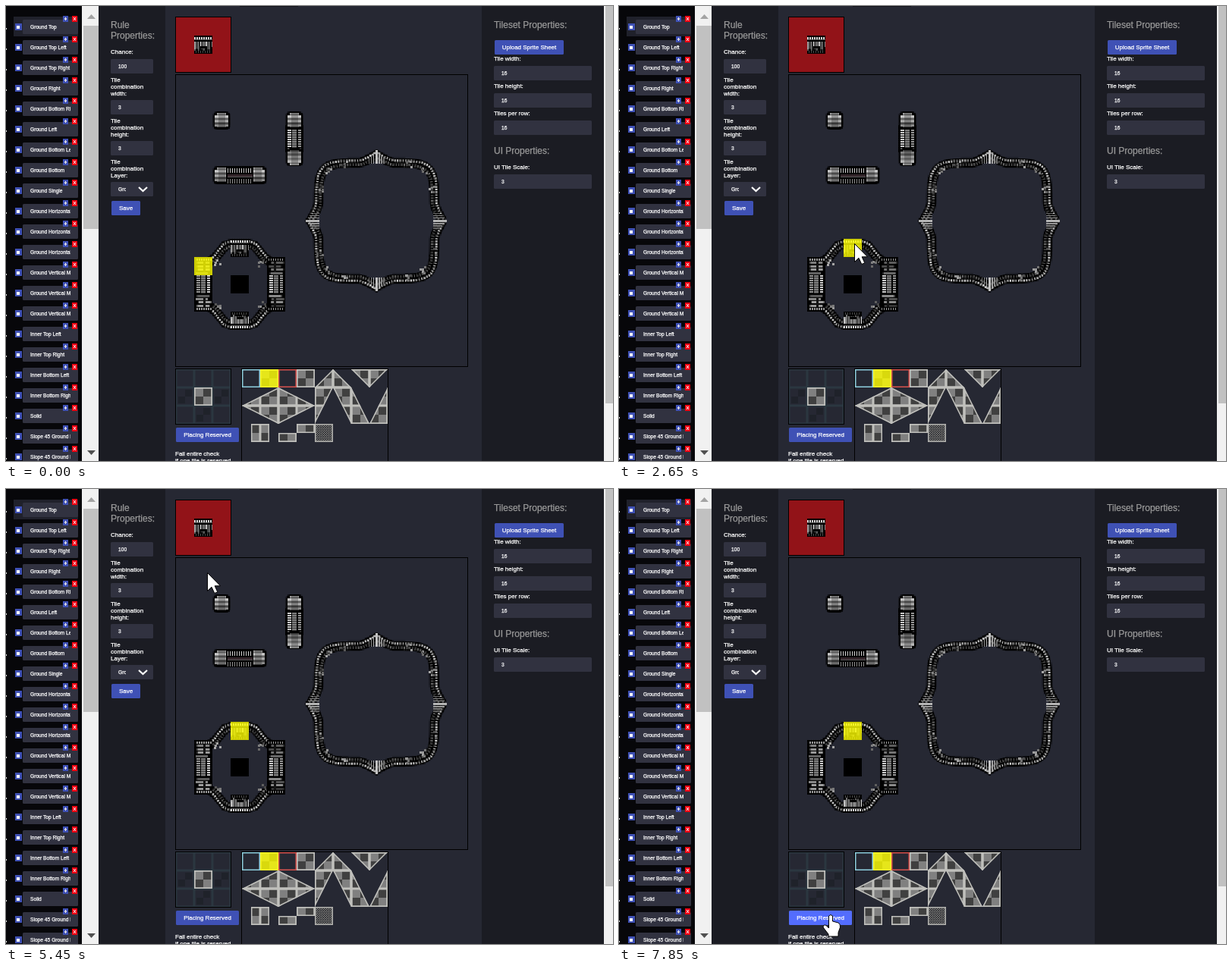
These frames come from a looping animation (800 px wide and 600 px high, 8000 ms). An HTML page with a canvas:

```html
<!DOCTYPE html>
<html lang="en">
<head>
<meta charset="utf-8">
<title>Tile rule editor</title>
<style>
html, body { margin: 0; width: 100%; height: 100%; overflow: hidden; background: #262833; }
#stage { position: relative; width: 800px; height: 600px; overflow: hidden; font: 8px/10px "Liberation Sans", Arial, sans-serif; color: #fff; }
canvas { position: absolute; left: 0; top: 0; }
#stage div { position: absolute; white-space: pre; -webkit-text-stroke: .25px; }
#stage .heading { font-size: 12px; color: #999; margin-top: 1px; }
#stage .value { font-size: 6.67px; overflow: hidden; margin-top: .5px; }
#stage .button { background: #3f51b5; border-radius: 1.5px; height: 19px; line-height: 19px; text-align: center; }
#stage .button.hover { background: #536dfe; }
</style>
</head>
<body>
<div id="stage"><canvas id="scene" width="800" height="600"></canvas></div>
<script>
const stage = document.getElementById('stage');
const c = document.getElementById('scene').getContext('2d');
const TILE = 24;
const SIDES = [1, -1];

// ---------- panels and text ----------
function put(x, y, text, cls = '', width) {
  const el = document.createElement('div');
  el.className = cls;
  el.textContent = text;
  el.style.left = x + 'px';
  el.style.top = y - (cls === 'button' ? 9.5 : 5) + 'px';
  if (width) el.style.width = width + 'px';
  stage.append(el);
  return el;
}
function rect(x, y, w, h, color) {
  c.fillStyle = color;
  c.fillRect(x, y, w, h);
}
function framed(x, y, w, h, color) {
  rect(x, y, w, h, '#000');
  rect(x + 1, y + 1, w - 2, h - 2, color);
}
function outline(x, y, size, color) {
  c.strokeStyle = color;
  c.lineWidth = 1.5;
  c.strokeRect(x + .75, y + .75, size - 1.5, size - 1.5);
}
function chevron(x, y, w, h) {
  c.beginPath();
  c.moveTo(x - w, y); c.lineTo(x, y + h); c.lineTo(x + w, y);
}
function scrollArrow(y, h, color) {
  chevron(112.5, y, 5.5, h);
  c.fillStyle = color;
  c.fill();
}
function field(x, y, w, text, clip = w - 20) {
  c.fillStyle = '#313240';
  c.beginPath();
  c.roundRect(x, y, w, 19, 1.5);
  c.fill();
  put(x + 10, y + 9.5, text, 'value', clip);
}

rect(0, 0, 800, 600, '#262833');
rect(0, 0, 100, 600, '#07070a');
rect(122, 0, 88, 600, '#1b1c23');
rect(627, 0, 161, 600, '#1b1c23');
rect(308, 0, 77, 1, '#14151b');

rect(100, 0, 22, 600, '#f1f1f1');
rect(102, 26, 20, 268, '#c1c1c1');
scrollArrow(17, -6, '#a3a3a3');
scrollArrow(586, 6, '#505050');
rect(788, 0, 12, 600, '#f1f1f1');
rect(790, 0, 10, 524, '#c1c1c1');

const ground = ['Top', 'Top Left', 'Top Right', 'Right', 'Bottom Right', 'Left', 'Bottom Left', 'Bottom', 'Single',
  ...Array(3).fill('Horizontal'), ...Array(3).fill('Vertical Mid')];
const inner = ['Top Left', 'Top Right', 'Bottom Left', 'Bottom Right'];
const rules = [...ground.map(s => 'Ground ' + s), ...inner.map(s => 'Inner ' + s),
  'Solid', 'Slope 45 Ground Left', 'Slope 45 Ground Right'];

rect(10, 14, 85, 26, '#20212b');
rules.forEach((name, i) => {
  const y = 18 + 27 * i;
  field(22, y, 73, name);
  rect(0, y + 11, 1, 2, '#ddd');
  rect(12, y + 5, 9, 9, '#3f51b5');
  rect(14, y + 8, 4, 4, '#fff');
  rect(75, y - 5, 7, 8, '#3f51b5');
  rect(78, y - 3, 1, 4, '#fff');
  rect(77, y - 2, 3, 2, '#ccd');
  rect(87, y - 5, 7, 8, '#f00012');
  for (const s of SIDES) {
    c.strokeStyle = '#fff';
    c.lineWidth = 1;
    c.beginPath();
    c.moveTo(90.5 - 1.5 * s, y - 3);
    c.lineTo(90.5 + 1.5 * s, y + 1);
    c.stroke();
  }
});

put(138, 24, 'Rule', 'heading');
put(138, 38, 'Properties:', 'heading');
put(138, 61, 'Chance:');
['width:', 'height:', 'Layer:'].forEach((word, i) => {
  ['Tile', 'combination', word].forEach((text, j) => put(138, 97.5 + 54 * i + 9 * j, text));
});
['100', '3', '3', 'Ground'].forEach((v, i) => field(138, 70 + 54 * i, 56, v, i === 3 ? 10 : 30));
chevron(180.5, 239, 5.5, 5);
c.strokeStyle = '#fff';
c.lineWidth = 2.2;
c.stroke();
put(139, 266.5, 'Save', 'button', 38);

put(643, 24, 'Tileset Properties:', 'heading');
put(644, 54.5, 'Upload Sprite Sheet', 'button', 91);
['Tile width:', 'Tile height:', 'Tiles per row:'].forEach((text, i) => {
  put(643, 70 + 36 * i, text);
  field(643, 79 + 36 * i, 129, '16');
});
put(643, 190, 'UI Properties:', 'heading');
put(643, 213, 'UI Tile Scale:');
field(643, 222, 129, '3');

const placing = put(224, 565.5, 'Placing Reserved', 'button', 83);
put(223, 590.5, 'Fail entire check');
put(223, 599.5, 'if one tile is reserved');

// ---------- tile map, drawn with 16 px tiles and enlarged ----------
const map = document.createElement('canvas');
map.width = map.height = 256;
const g = map.getContext('2d');

let seed = 11;
const random = () => (seed = seed * 16807 % 2147483647) / 2147483647;
const grey = v => `rgb(${v},${v},${v})`;

function box(x, y, w, h, v) {
  g.fillStyle = grey(v);
  g.fillRect(x, y, w, h);
}
function place(x, y, sx, sy, draw) {
  g.save();
  g.translate(x, y);
  g.scale(sx, sy);
  draw();
  g.restore();
}
function mirror(x, y, draw) {
  for (const sx of SIDES) for (const sy of SIDES) place(x, y, sx, sy, draw);
}
function columns(x, y, w, h, v) {
  for (let i = 0; i < w; i += 2) box(x + i, y, 1, h, v);
}
function rows(x, y, w, h, v) {
  for (let i = 0; i < h; i += 2) box(x, y + i, w, 1, v);
}
function cap(x, y) {
  g.fillStyle = '#000';
  g.beginPath();
  g.roundRect(x + .5, y, 15, 16, 4);
  g.fill();
  for (let i = 1; i < 14; i++) {
    const inset = i < 3 || i > 12 ? 4 : 2;
    const v = 185 - 7 * i + 45 * Math.cos(i * 1.6);
    box(x + inset, y + i, 16 - 2 * inset, 1, v);
    box(x + 5, y + i, 6, 1, v * .75);
  }
}
function groundTop(x, y) {
  box(x, y, 16, 16, 0);
  columns(x, y + 1, 16, 2, 215);
  box(x, y + 3, 16, 1, 80);
  for (let i = 0; i < 16; i++) box(x + i, y + 5, 1, 5 + 3 * random(), 240 * random());
  box(x + 5, y + 9, 6, 2, 0);
  columns(x + 1, y + 13, 14, 2, 75);
}
function pipe(x, y, h) {
  box(x, y, 16, h, 0);
  rows(x + 2, y, 3, h, 205);
  box(x + 6, y, 4, h, 60);
  rows(x + 6, y, 4, h, 125);
  rows(x + 11, y, 3, h, 150);
}
function line(points, scale, width, v, dash = []) {
  g.strokeStyle = grey(v);
  g.lineWidth = width;
  g.setLineDash(dash);
  g.beginPath();
  points.forEach(([x, y]) => g.lineTo(x * scale, y * scale));
  g.stroke();
}
function tube(points, lift) {
  line(points, 1, 8.5, 0);
  line(points, 1 - lift, 2.5, 105, [1, 1.4]);
  line(points, 1 + lift, 2, 210, [1.2, 1.2]);
}
function rivets(x, y) {
  for (let i = 0; i < 5; i++) {
    box(x + Math.floor(6 * random()), y + Math.floor(6 * random()), 2, 2, 60 + 110 * random());
  }
}

// Separate pieces
cap(32, 32);
pipe(96, 44, 24);
cap(96, 32);
place(0, 160, 1, -1, () => cap(96, 80));
cap(32, 80);
cap(64, 80);
box(44, 80, 24, 16, 0);
columns(45, 82, 22, 4, 205);
g.fillStyle = '#35272c';
g.fillRect(45, 87, 22, 2);
box(45, 89, 22, 1, 90);
columns(45, 91, 22, 4, 140);

// Octagon
mirror(56, 184, () => {
  tube([[7, -36], [13, -34], [22, -23], [27, -20]], .06);
  rivets(16, -22);
  box(24, -24, 16, 16, 0);
  columns(25, -23, 14, 2, 150);
  for (let y = -20; y < -9; y += 3) box(25 + 3 * random(), y, 11, 2, 50 + 110 * random());
  box(30, -20, 2, 9, 20);
});
groundTop(48, 144);
place(0, 368, 1, -1, () => groundTop(48, 144));
for (const side of SIDES) place(56, 184, side, 1, () => pipe(24, -8, 16));
box(48, 176, 16, 16, 0);

// Large ring: a rounded square with a cusp on each side
const ring = Array.from({ length: 241 }, (_, i) => {
  const angle = i * Math.PI / 120;
  const cos = Math.cos(angle), sin = Math.sin(angle);
  const square = 51 / (cos ** 6 + sin ** 6) ** (1 / 6);
  const offAxis = square * Math.min(Math.abs(cos), Math.abs(sin));
  const r = square + 7 * Math.max(0, 1 - offAxis / 16) ** 1.5;
  return [r * cos, r * sin];
});
place(176, 128, 1, 1, () => tube(ring, .035));
mirror(176, 128, () => {
  rivets(38, -47);
  rivets(25, -53);
  rivets(46, -31);
  for (let i = 0; i < 8; i += 2) {
    box(i, -62 + i, 1, 12 - i, 195 - 14 * i);
    box(50, i, 12 - i, 1, 180 - 14 * i);
  }
});

framed(223, 14, 74, 74, '#921318');
framed(223, 90, 386, 386, '#262833');
c.imageSmoothingEnabled = false;
c.drawImage(map, 224, 91, 384, 384);
const drawTop = (ctx, x, y) => ctx.drawImage(map, 48, 144, 16, 16, x, y, TILE, TILE);
drawTop(c, 248, 39);

// ---------- tile palette ----------
function checkered(ox, oy, points) {
  c.save();
  c.beginPath();
  points.forEach(([x, y]) => c.lineTo(ox + x * TILE, oy + y * TILE));
  c.closePath();
  c.clip();
  for (let i = 0; i < 16; i++) for (let j = 0; j < 8; j++) {
    rect(ox + 12 * i, oy + 12 * j, 12, 12, (i + j) % 2 ? '#404040' : '#808080');
  }
  c.strokeStyle = '#c0c0bc';
  c.lineWidth = 3;
  c.stroke();
  for (let i = 0; i <= 8; i++) {
    rect(ox + TILE * i - 1.5, oy, 3, 96, '#c0c0bc');
    rect(ox, oy + TILE * i - 1.5, 192, 3, '#c0c0bc');
  }
  c.restore();
}
const block = (x, y, w = 1, h = 1) => checkered(311, 479, [[x, y], [x + w, y], [x + w, y + h], [x, y + h]]);
const slope = (x, y, w, h) => checkered(311, 479, [[x, y], [x + w, y], [x, y + h]]);

framed(223, 478, 74, 74, '#262833');
for (let i = 0; i < 9; i++) {
  const x = 224 + TILE * (i % 3), y = 479 + TILE * Math.floor(i / 3);
  outline(x, y, TILE, '#2b3740');
  if (i > 2 && i !== 6 && i !== 8) {
    rect(x + 12, y + 3, 9, 9, '#1f222a');
    rect(x + 3, y + 12, 9, 9, '#1f222a');
  }
}
checkered(248, 503, [[0, 0], [1, 0], [1, 1], [0, 1]]);

framed(310, 478, 194, 130, '#262833');
block(1, 0);
block(3, 0);
block(.5, 3);
block(2, 3.5, 1, .5);
block(3, 3, 1, .5);
for (const s of SIDES) {
  slope(5, 1, s, -1);
  slope(7, 0, s, 1);
  slope(2, 2, 2 * s, 1);
  slope(2, 2, 2 * s, -1);
  slope(5 - s, 1, s, 2);
  slope(7 - s, 3, s, -2);
}
outline(311, 479, TILE, '#8fd0df');
outline(359, 479, TILE, '#d9534f');
for (let i = 0; i < 256; i++) {
  const x = i % 16, y = Math.floor(i / 16);
  rect(407 + 1.5 * x, 551 + 1.5 * y, 1.5, 1.5, (x + y) % 2 ? '#858585' : '#2c2c2c');
}
outline(407, 551, TILE, '#b4b4b0');
rect(335, 479, TILE, TILE, 'rgba(255,255,0,.8)');

// ---------- pointer ----------
const overlay = document.createElement('canvas');
overlay.width = 800;
overlay.height = 600;
stage.append(overlay);
const o = overlay.getContext('2d');
o.imageSmoothingEnabled = false;

const arrow = new Path2D('M.5 .5V24.5L6 19.3L9.8 27.5L13.8 25.8L10.2 17.8H17.5Z');
const hand = new Path2D('M-2.5 2Q0-1 2.5 2V9L10 11Q13 12 12.5 17L10 24V29H-3V26L-10 17Q-9.5 12.5-6 14.5L-2.5 18Z');

// Each move: first and last step time, then the resting point it eases to.
const STEP = 70;
const moves = [
  [800, 1500, 290, 198], [1570, 1850, 323, 325], [1920, 2180, 310, 303],
  [2380, 2380, 292, 295], [2650, 2650, 310, 313], [2920, 2990, 308, 315],
  [3190, 3820, 262, 32], [4090, 4570, 232, 49], [4640, 4710, 238, 34], [4910, 5050, 261, 32],
  [5380, 6140, 273, 283], [6210, 6410, 376, 388],
  [6670, 7230, 286, 533], [7300, 7440, 278, 555], [7510, 7580, 319, 571], [7650, 7850, 279, 561]
];

function pointerAt(t) {
  let x = 734, y = 637;
  for (const [start, end, toX, toY] of moves) {
    if (t < start) break;
    const stepped = Math.floor((t - start) / STEP + 1) * STEP;
    const k = t >= end ? 1 : Math.min(1, stepped / (end - start + STEP));
    const eased = 1 - (1 - k) ** 2;
    x += (toX - x) * eased;
    y += (toY - y) * eased;
  }
  return [Math.round(x), Math.round(y)];
}
const inside = ([x, y], left, top, right, bottom) => x >= left && x < right && y >= top && y < bottom;
const snap = (v, origin) => origin + Math.floor((v - origin) / TILE) * TILE;

function drawPointer([x, y], path) {
  o.save();
  o.translate(x, y);
  o.fillStyle = '#fff';
  o.fill(path);
  o.stroke(path);
  o.restore();
}

function frame(now) {
  const t = now % 8000;
  const tip = pointerAt(t);
  const onButton = inside(tip, 224, 556, 307, 575);
  placing.classList.toggle('hover', onButton);

  o.clearRect(0, 0, 800, 600);
  o.fillStyle = 'rgba(255,255,0,.8)';
  o.fillRect(...(t < 2650 ? [248, 331] : [296, 307]), TILE, TILE);

  if (inside(tip, 224, 15, 296, 87)) {
    o.globalAlpha = .45;
    drawTop(o, snap(tip[0], 224), snap(tip[1], 15));
    o.globalAlpha = 1;
  }
  drawPointer(tip, onButton ? hand : arrow);
  requestAnimationFrame(frame);
}
requestAnimationFrame(frame);
</script>
</body>
</html>
```
